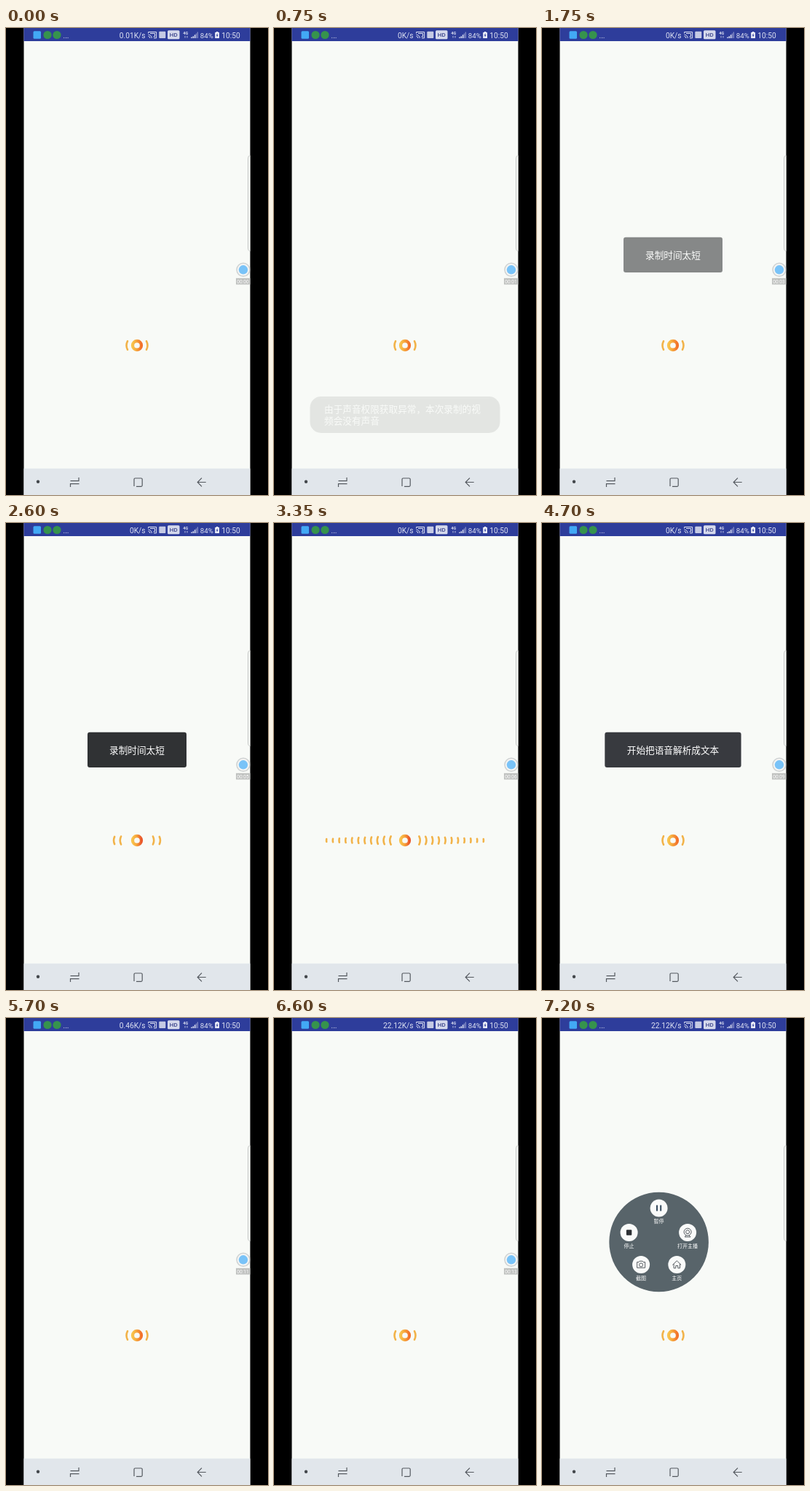
Write an HTML page that moves like this. It is 360 by 640 pixels and loops after 7250 ms.

```html
<!DOCTYPE html>
<html lang="zh">
<head>
<meta charset="utf-8">
<style>
  html, body { margin: 0; width: 100%; height: 100%; overflow: hidden; background: #000; }
  svg { display: block; width: 360px; height: 640px; }
  text { font-family: "Noto Sans CJK SC", "Noto Sans CJK", sans-serif; fill: #fff; }
  .status text { font-family: Roboto, sans-serif; font-size: 10.2px; fill: #dfe3f3; }
  .toast text { font-size: 12.65px; }
  .menu text { font-size: 7px; font-weight: 500; text-anchor: middle; }
  .line { fill: none; stroke: #555a60; stroke-width: 1.2; }
</style>
</head>
<body>
<svg viewBox="0 0 360 640">
  <defs>
    <linearGradient id="ringFill">
      <stop offset="0" stop-color="#f8c34c"/>
      <stop offset=".45" stop-color="#f6a53c"/>
      <stop id="ringEnd" offset="1" stop-color="#f2702a"/>
    </linearGradient>
    <clipPath id="screenClip"><rect x="24.5" width="311" height="640"/></clipPath>
  </defs>
  <rect width="360" height="640"/>
  <g clip-path="url(#screenClip)">
    <rect x="24" width="312" height="640" fill="#f8faf7"/>

    <g class="status">
      <rect x="24" width="312" height="18" fill="#2e3d9b"/>
      <rect x="37.5" y="4.3" width="10.5" height="10.5" rx="1.5" fill="#42a9f5"/>
      <circle cx="57" cy="9.5" r="5.6" fill="#36934d"/>
      <circle cx="70" cy="9.5" r="5.6" fill="#36934d"/>
      <text x="78.5" y="13.5">...</text>
      <text id="speed" x="191.5" y="13.7" text-anchor="end"></text>
      <g fill="none" stroke="#dfe3f3">
        <path d="M195.6 7.5V5.5H206.6V13.8H203M195.5 9.2A4.8 4.8 0 0 1 200.3 14M195.5 11.5A2.5 2.5 0 0 1 198 14M198 7.5H204.5V11.8H202.5"/>
        <path d="M246 10.8V13.5M249 10.8V13.5" stroke-width=".8"/>
      </g>
      <rect x="210.3" y="4.8" width="9" height="9.2" rx="1" fill="#c5cae4"/>
      <rect x="222" y="3.3" width="16.5" height="12" rx="1.5" fill="#d5d9ec"/>
      <text x="230.3" y="12.3" text-anchor="middle" style="font-size:8px;font-weight:500;fill:#39428a">HD</text>
      <text x="243.2" y="9.4" style="font-size:5.6px;font-weight:700">4G</text>
      <path d="M255 14V12.6M257.3 14V11.2M259.6 14V9.2" stroke="#dfe3f3" stroke-width="1.5"/>
      <path d="M261.4 14V7.4M263.3 14V5.6" stroke="#8790c6" stroke-width="1.3"/>
      <text x="266.8" y="13.7" style="font-size:9.7px">84%</text>
      <path d="M287.2 6H288.8V4.9H291.4V6H293V14H287.2Z" fill="#eceef8"/>
      <path d="M290.7 7L288.6 10.4H290L289.5 13L291.7 9.5H290.3Z" fill="#2e3d9b"/>
      <text x="296.3" y="13.7">10:50</text>
    </g>

    <path d="M337 175H335Q332.5 175 332.5 179V301Q332.5 305.5 335 305.5H337" fill="#f3f5f2" stroke="#c9cbc9"/>

    <g id="ball">
      <circle cx="326" cy="331.3" r="9" fill="#f4f5f4" stroke="#cfd2d2" stroke-width="1.5"/>
      <circle cx="326" cy="331.3" r="6.2" fill="#79c3f8"/>
      <rect x="316" y="342.8" width="20" height="8.7" fill="#c0c2c0"/>
      <text id="clock" x="317.2" y="349.6" style="font:6.6px Roboto,sans-serif"></text>
    </g>

    <g transform="translate(180 435)">
      <circle r="6" fill="none" stroke="url(#ringFill)" stroke-width="4.3"/>
      <path id="waves" fill="none" stroke="#f2b34a" stroke-width="2.6" stroke-linecap="round"/>
    </g>

    <g id="toasts"></g>
    <g id="menu" class="menu">
      <circle r="68.3" fill="#58646a"/>
      <g id="buttons"></g>
    </g>

    <rect x="24" y="603.7" width="312" height="37" fill="#e1e6eb"/>
    <circle cx="44" cy="621.8" r="2.2" fill="#44484c"/>
    <g class="line">
      <path d="M88.5 620.6H100V616M88.5 629V624.6H100.5"/>
      <path d="M176 628V618.5Q176 617 177.5 617H185.7Q187.2 617 187.2 618.5V620M187.2 620V626.8Q187.2 628.3 185.7 628.3H179"/>
      <path d="M274.7 622.5H263.5M269 616.7L263.2 622.5L269 628.3"/>
    </g>
  </g>
</svg>
<script>
const LOOP = 7250;
const PRESS = [2500, 4450];
const FADE = 150;
const WAVE = { gap: 8.72, step: 70, start: 17, end: 116 };
const MENU_OPEN = 6750;
const SPEEDS = [[0, "0.01K/s"], [400, "0K/s"], [5300, "0.46K/s"], [6500, "22.12K/s"]];

const TOASTS = [
  { from: 741, to: 1700, x: 49.5, y: 505, w: 261, h: 50, rx: 15, fill: "#5f615f",
    tx: 69, ty: 527.3, lines: ["由于声音权限获取异常，本次录制的视", "频会没有声音"] },
  { from: 1700, to: 2740, x: 112, y: 286.8, w: 136, h: 48.2, rx: 3, fill: "#303234",
    tx: 142, ty: 315.7, lines: ["录制时间太短"] },
  { from: 4450, to: 5480, x: 86.3, y: 286.8, w: 187.3, h: 48.2, rx: 3, fill: "#383a3f",
    tx: 116.8, ty: 315.7, lines: ["开始把语音解析成文本"] }
];

// Button positions are relative to the menu centre.
const BUTTONS = [
  [0, -46.5, "暂停", '<path d="M-2.6-4V4M2.6-4V4" stroke="#34495c" stroke-width="2"/>'],
  [-41, -13, "停止", '<rect x="-3.7" y="-3.7" width="7.4" height="7.4" rx="1" fill="#2c2f33"/>'],
  [39.5, -13, "打开主播", '<g class="line" style="stroke-width:1"><circle cy="-.8" r="5"/><circle cy="-.8" r="2.5"/><path d="M-2 4L-4 6H4L2 4"/></g>'],
  [-24.5, 31, "截图", '<g class="line" style="stroke-width:1"><path d="M-5.5-3.5H-3L-2-4.8H2L3-3.5H5.5V4.3H-5.5Z"/><circle cy=".4" r="2.5"/></g>'],
  [24.7, 31, "主页", '<path class="line" style="stroke-width:1" d="M-6 .5L0-5.3L6 .5M-4.2-1V4.8H-1.5V1.5H1.5V4.8H4.2V-1"/>']
];

const $ = id => document.getElementById(id);
const clamp = v => Math.max(0, Math.min(1, v));
const easeOut = p => 1 - (1 - p) ** 2;

$("toasts").innerHTML = TOASTS.map(o =>
  `<g class="toast"><rect x="${o.x}" y="${o.y}" width="${o.w}" height="${o.h}" rx="${o.rx}" fill="${o.fill}"/>` +
  o.lines.map((s, i) => `<text x="${o.tx}" y="${o.ty + i * 16}">${s}</text>`).join("") + "</g>").join("");

$("buttons").innerHTML = BUTTONS.map(([x, y, label, icon]) =>
  `<g transform="translate(${x} ${y})"><circle r="12" fill="#fafbfa"/>${icon}<text y="20.5">${label}</text></g>`).join("");

const toastNodes = [...$("toasts").children];

function arcPair(d) {
  const half = (14 - 0.085 * (d - 14)) / 2 - 1.1;
  const bow = 1.6 * (half / 6) ** 2;
  return [-1, 1].map(s =>
    `M${s * (d - bow)} ${-half}Q${s * (d + bow)} 0 ${s * (d - bow)} ${half}`).join("");
}

function wavePath(t) {
  if (t < PRESS[0] || t >= PRESS[1]) return arcPair(14.5);
  const travel = (t - PRESS[0]) / WAVE.step * WAVE.gap;
  // Lines the wave train up so that arcs leave the ring at a steady rate.
  const phase = (travel + 2.4) % WAVE.gap;
  const front = Math.min(WAVE.end, WAVE.start + travel + WAVE.gap);
  let path = "";
  for (let d = WAVE.start + phase; d < front; d += WAVE.gap) path += arcPair(d);
  return path;
}

function render(t) {
  const pressed = t >= PRESS[0] && t < PRESS[1];
  $("speed").textContent = SPEEDS.filter(([at]) => t >= at).pop()[1];
  $("clock").textContent = "00:" + String(Math.floor(t / 500)).padStart(2, "0");
  $("waves").setAttribute("d", wavePath(t));
  $("ringEnd").setAttribute("stop-color", pressed ? "#e9562b" : "#f2702a");

  TOASTS.forEach((o, i) => {
    const shown = Math.min(clamp((t - o.from) / FADE), clamp((o.to - t) / FADE));
    toastNodes[i].setAttribute("opacity", easeOut(shown));
  });

  const open = easeOut(clamp((t - MENU_OPEN) / 200));
  $("ball").setAttribute("opacity", t < MENU_OPEN ? 1 : 0);
  $("menu").setAttribute("opacity", open);
  $("menu").setAttribute("transform", `translate(160.6 307) scale(${0.3 + 0.7 * open})`);
}

const begin = performance.now();
function tick() {
  render((performance.now() - begin) % LOOP);
  requestAnimationFrame(tick);
}
render(0);
requestAnimationFrame(tick);
</script>
</body>
</html>
```
